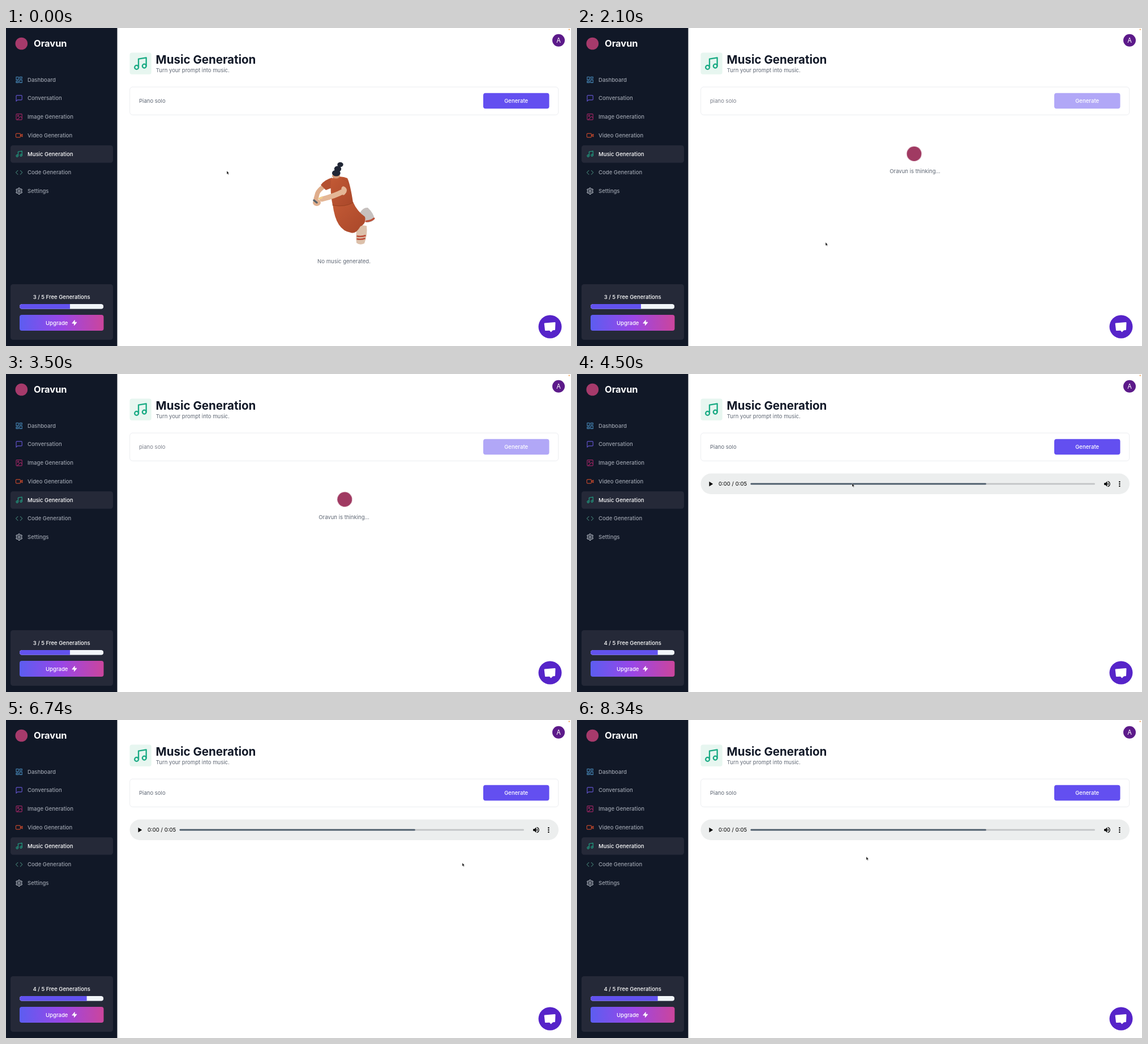
An HTML page that plays this animation: 998x561 px, repeating every 8.36 s.

```html
<!DOCTYPE html>
<html lang="en">
<head>
<meta charset="utf-8">
<title>Music Generation</title>
<style>
  html, body { margin: 0; width: 100%; height: 100%; overflow: hidden; background: #fff; }
  svg { display: block; width: 100vw; height: 100vh; font: 9.55px Inter, "Open Sans", sans-serif; }
  .mid { text-anchor: middle; }
  .med { font-weight: 500; }
  .bold { font-weight: 700; }
  .muted { fill: #5f6774; }
  .line { fill: none; stroke-width: 2; stroke-linecap: round; stroke-linejoin: round; }

  /* One 8360 ms clock for every part */
  .idle, .busy, .done, .hint, .typed, .letter, .dim, .count, .bar, .cursor, .orbit {
    animation: 8360ms linear infinite;
  }
  .idle { animation-name: idle; }
  .busy { animation-name: busy; }
  .done { animation-name: done; }
  .hint { animation-name: hint; }
  .typed { animation-name: typed; }
  .dim { animation-name: dim; }
  .bar { animation-name: bar; transform-origin: 24px 0; }
  .orbit { animation-name: orbit; transform-origin: 597px 222px; }
  .letter {
    animation-name: letter;
    animation-delay: calc(550ms + var(--i) * 72ms);
    animation-fill-mode: backwards;
  }
  .cursor { animation-name: move, blink; animation-timing-function: ease-in-out, linear; }

  @keyframes idle { 0%, 17.93% { opacity: 1 } 17.94%, 100% { opacity: 0 } }
  @keyframes busy { 0%, 17.93% { opacity: 0 } 17.94%, 47.84% { opacity: 1 } 47.85%, 100% { opacity: 0 } }
  @keyframes done { 0%, 47.84% { opacity: 0 } 47.85%, 100% { opacity: 1 } }
  @keyframes hint { 0%, 6.57% { opacity: 1 } 6.58%, 47.84% { opacity: 0 } 47.85%, 100% { opacity: 1 } }
  @keyframes typed {
    0%, 6.57% { opacity: 0 } 6.58%, 17.93% { opacity: 1 }
    17.94%, 47.84% { opacity: .55 } 47.85%, 100% { opacity: 0 }
  }
  @keyframes dim { 0%, 17.93% { opacity: 1 } 17.94%, 47.84% { opacity: .5 } 47.85%, 100% { opacity: 1 } }
  @keyframes letter { 0%, 60% { fill-opacity: 1 } 60.01%, 100% { fill-opacity: 0 } }
  @keyframes bar { 0%, 47.84% { transform: scaleX(.6) } 47.85%, 100% { transform: scaleX(.8) } }
  @keyframes orbit { from { transform: rotate(147deg) } to { transform: rotate(3156.6deg) } }
  @keyframes move {
    0% { transform: translate(390px, 252px) }
    4.8%, 17.9% { transform: translate(300px, 127px) }
    25.12%, 36% { transform: translate(439px, 378px) }
    47.8% { transform: translate(452px, 250px) }
    53.83% { transform: translate(486px, 193px) }
    65.5%, 70.5% { transform: translate(959px, 192px) }
    80.62% { transform: translate(806px, 252px) }
    99.76%, 100% { transform: translate(511px, 241px) }
  }
  @keyframes blink {
    0%, 6.57% { opacity: 1 } 6.58%, 17.93% { opacity: 0 }
    17.94%, 35.9% { opacity: 1 } 35.91%, 47.84% { opacity: 0 }
    47.85%, 100% { opacity: 1 }
  }
</style>
</head>
<body>
<svg viewBox="0 0 998 561" preserveAspectRatio="none">
  <defs>
    <linearGradient id="upgrade">
      <stop offset="0" stop-color="#5c5df1"/>
      <stop offset=".5" stop-color="#9a46e6"/>
      <stop offset="1" stop-color="#cb459c"/>
    </linearGradient>
    <linearGradient id="cloth" x2="1" y2="1">
      <stop offset="0" stop-color="#c35a35"/>
      <stop offset="1" stop-color="#a9472a"/>
    </linearGradient>
  </defs>

  <rect width="998" height="561" fill="#fff"/>

  <!-- Sidebar -->
  <rect width="196.5" height="561" fill="#111827"/>
  <circle cx="27.3" cy="27.5" r="10.8" fill="#a63a6b"/>
  <text class="bold" x="49" y="33" font-size="16.4" fill="#fff">Oravun</text>
  <g fill="#252938">
    <rect x="8" y="207" width="181" height="30.7" rx="4.5"/>
    <rect x="8" y="452" width="181" height="98" rx="4.5"/>
  </g>
  <g id="nav" class="med"></g>

  <g class="mid med" fill="#fff">
    <text class="hint-free" x="98.2" y="478.4"><tspan id="used"></tspan></text>
    <g class="before"></g>
  </g>
  <g id="quota" class="mid med" fill="#fff"></g>
  <clipPath id="pill"><rect x="24" y="487" width="148.3" height="8.8" rx="4.4"/></clipPath>
  <g clip-path="url(#pill)">
    <rect x="24" y="487" width="148.3" height="8.8" fill="#f1f5f9"/>
    <rect class="bar" x="24" y="487" width="148.3" height="8.8" fill="#6252ee"/>
  </g>
  <rect x="24" y="506" width="148.5" height="28" rx="4" fill="url(#upgrade)"/>
  <text class="med" x="70" y="523.5" fill="#fff">Upgrade</text>
  <path transform="translate(115.4 514.6) scale(.455)" d="M13 2 3 14h9l-1 8 10-12h-9z"
    fill="#fff" stroke="#fff" stroke-width="2" stroke-linejoin="round"/>

  <!-- Header -->
  <rect x="218.5" y="43.5" width="38.3" height="38.2" rx="4" fill="#e7f6f0"/>
  <g id="badge"></g>
  <text class="bold" x="264.6" y="63.3" font-size="20.5" fill="#111827">Music Generation</text>
  <text class="muted" x="264.8" y="78.3">Turn your prompt into music.</text>
  <circle cx="976" cy="21.8" r="11" fill="#5c1a8a"/>
  <text class="mid" x="976" y="25.9" font-size="11.2" fill="#fff">A</text>
  <circle cx="994.8" cy="2.6" r="1.2" fill="#f2a65a"/>

  <!-- Prompt -->
  <rect x="218.7" y="104" width="757" height="49.3" rx="5" fill="#fff" stroke="#e6e8ec" stroke-width=".8"/>
  <text class="hint muted" x="235" y="132">Piano solo</text>
  <text id="typed" class="typed" x="235" y="132" fill="#0f172a"></text>
  <g class="dim">
    <rect x="843" y="114.8" width="116.5" height="27.4" rx="4" fill="#634ff0"/>
    <text class="mid med" x="901.2" y="132" fill="#fff">Generate</text>
  </g>

  <!-- Empty state -->
  <g class="idle">
    <g stroke-linecap="round" stroke-linejoin="round">
      <path d="M625 326Q631 316 639 317Q649 326 651 337Q647 343 637 343Q634 334 625 326Z" fill="#c6c0be"/>
      <path d="M636 341Q644 341 650 336" fill="none" stroke="#bd5038" stroke-width="3"/>
      <path d="M621 347L637 349Q639 364 633 380Q625 384 619 379Q617 363 621 347Z" fill="#dcc0aa"/>
      <path d="M619.5 367Q627 369 635.5 366M619.5 372Q627 374 634.5 371" fill="none" stroke="#bd4f3b" stroke-width="2.6" stroke-linecap="butt"/>
      <path d="M562 279Q552 286 550 292L547 303" fill="none" stroke="#dfad8b" stroke-width="8"/>
      <path d="M576 264Q562 268 556 277L565 286L578 281Z" fill="#b45030"/>
      <path d="M577 311Q598 317 613 307Q620 323 634 333Q637 345 626 350Q618 364 609 361Q596 359 588 347Q580 335 577 311Z" fill="url(#cloth)"/>
      <path d="M574 266Q590 259 603 265Q608 275 613 308Q598 317 577 313Q572 290 574 266Z" fill="url(#cloth)"/>
      <path d="M577 312.5Q598 317 613 308" fill="none" stroke="#96401f" stroke-width=".9"/>
      <path d="M596 288Q582 296 558 302" fill="none" stroke="#e4b696" stroke-width="9"/>
      <path d="M594 266Q608 270 606 282" fill="none" stroke="#a8492b" stroke-width=".8"/>
      <path d="M596 283Q601 286 596 291" fill="none" stroke="#e4b696" stroke-width="7"/>
      <ellipse cx="549" cy="308" rx="7" ry="6" fill="#e0b08f"/>
      <path d="M544 304L549 308" stroke="#59636c" stroke-width="3.5"/>
      <path d="M553 301L558 299" stroke="#f1cf8d" stroke-width="3"/>
      <ellipse cx="583" cy="261" rx="7" ry="4.5" fill="#d49a78"/>
    </g>
    <g fill="#202635">
      <ellipse cx="590.5" cy="241" rx="5.2" ry="4.2"/>
      <ellipse cx="586" cy="248.5" rx="6.2" ry="5.3"/>
      <ellipse cx="583.3" cy="256" rx="7.4" ry="5.6"/>
    </g>
    <text class="mid muted" x="597" y="414.6">No music generated.</text>
  </g>

  <!-- Loading -->
  <g class="busy">
    <g class="orbit"><circle cx="598.5" cy="222" r="13" fill="#a03a62"/></g>
    <text class="mid muted" x="597" y="256.3">Oravun is thinking...</text>
  </g>

  <!-- Player -->
  <g class="done">
    <rect x="218.5" y="175.6" width="757.5" height="36.4" rx="18.2" fill="#eceeee"/>
    <path d="M233.5 189.8V198.2L240.2 194Z"/>
    <text x="250" y="197.1">0:00 / 0:05</text>
    <rect x="306.5" y="192.5" width="608.5" height="2.8" rx="1.4" fill="#c2c4c6"/>
    <rect x="306.5" y="192.5" width="416.3" height="2.8" rx="1.4" fill="#4d5d6c"/>
    <path transform="translate(929.3 186.9) scale(.59)"
      d="M3 9v6h4l5 5V4L7 9zM16.5 12c0-1.8-1-3.3-2.5-4v8c1.5-.7 2.5-2.2 2.5-4zM14 3.2v2.1a7 7 0 0 1 0 13.4v2.1a9 9 0 0 0 0-17.6z"/>
    <circle cx="958.4" cy="190.2" r="1.2"/>
    <circle cx="958.4" cy="194" r="1.2"/>
    <circle cx="958.4" cy="197.8" r="1.2"/>
  </g>

  <!-- Chat button -->
  <circle cx="961" cy="527" r="20.5" fill="#5624c9"/>
  <path d="M951.5 520.5L969.3 519Q970.5 519 970.5 520L970 532Q970 533 969 533L966 533.3L962.5 536.5L960 533.7L953 534Q952 534 952 533L950.7 521.5Q950.7 520.6 951.5 520.5Z" fill="#fff"/>

  <path class="cursor" d="M0 0V6L1.4 4.8 2.3 6.8 3.3 6.4 2.4 4.5H4.1Z" fill="#111" stroke="#fff" stroke-width=".35"/>
</svg>
<script>
  const $ = id => document.getElementById(id);

  const tooth = "M9.78 4a2 2 0 0 1 2-2h.44a2 2 0 0 1 2 2v.18a2 2 0 0 0 1 1.73l.43.25a2 2 0 0 0 2 0l.15-.08";
  const gear = [0, 60, 120, 180, 240, 300]
    .map(a => `<path d="${tooth}" transform="rotate(${a} 12 12)"/>`).join("");

  const icons = {
    board: '<path d="M3 3h7v9H3zM14 3h7v5h-7zM14 12h7v9h-7zM3 16h7v5H3z"/>',
    chat: '<path d="M21 15a2 2 0 0 1-2 2H7l-4 4V5a2 2 0 0 1 2-2h14a2 2 0 0 1 2 2z"/>',
    image: '<rect x="3" y="3" width="18" height="18" rx="2"/><circle cx="9" cy="9" r="2"/><path d="m21 15-3.1-3.1a2 2 0 0 0-2.8 0L6 21"/>',
    video: '<path d="m22 8-6 4 6 4z"/><rect x="2" y="6" width="14" height="12" rx="2"/>',
    music: '<path d="M9 18V5l12-2v13"/><circle cx="6" cy="18" r="3"/><circle cx="18" cy="16" r="3"/>',
    code: '<path d="m16 18 6-6-6-6M8 6l-6 6 6 6"/>',
    gear: gear + '<circle cx="12" cy="12" r="3"/>'
  };

  const icon = (name, x, y, size, color) =>
    `<g class="line" stroke="${color}" transform="translate(${x} ${y}) scale(${size / 24})">${icons[name]}</g>`;

  const items = [
    ["Dashboard", "board", "#4686b6"],
    ["Conversation", "chat", "#6354cf"],
    ["Image Generation", "image", "#9c2562"],
    ["Video Generation", "video", "#c2482c"],
    ["Music Generation", "music", "#21a184"],
    ["Code Generation", "code", "#3c6f68"],
    ["Settings", "gear", "#b4bac4"]
  ];

  $("nav").innerHTML = items.map(([label, name, color], i) => {
    const y = 91.3 + i * 32.72;
    const fill = name === "music" ? "#fff" : "#9ca2ad";
    return icon(name, 16.3, y - 6.8, 13.64, color) +
      `<text x="38" y="${y + 3.4}" fill="${fill}">${label}</text>`;
  }).join("");

  $("badge").innerHTML = icon("music", 223.8, 48.9, 27.3, "#18aa83");

  // The counter changes when the track arrives.
  const quota = (n, from, to) =>
    `<text x="98.2" y="478.4" style="animation:${n === 3 ? "before" : "done"} 8360ms linear infinite">${n} / 5 Free Generations</text>`;
  const sheet = document.styleSheets[0];
  sheet.insertRule("@keyframes before { 0%, 47.84% { opacity: 1 } 47.85%, 100% { opacity: 0 } }", sheet.cssRules.length);
  $("quota").innerHTML = quota(3) + quota(4);

  $("typed").innerHTML = [..."piano solo"]
    .map((c, i) => `<tspan class="letter" style="--i:${i}">${c}</tspan>`).join("");
</script>
</body>
</html>
```
